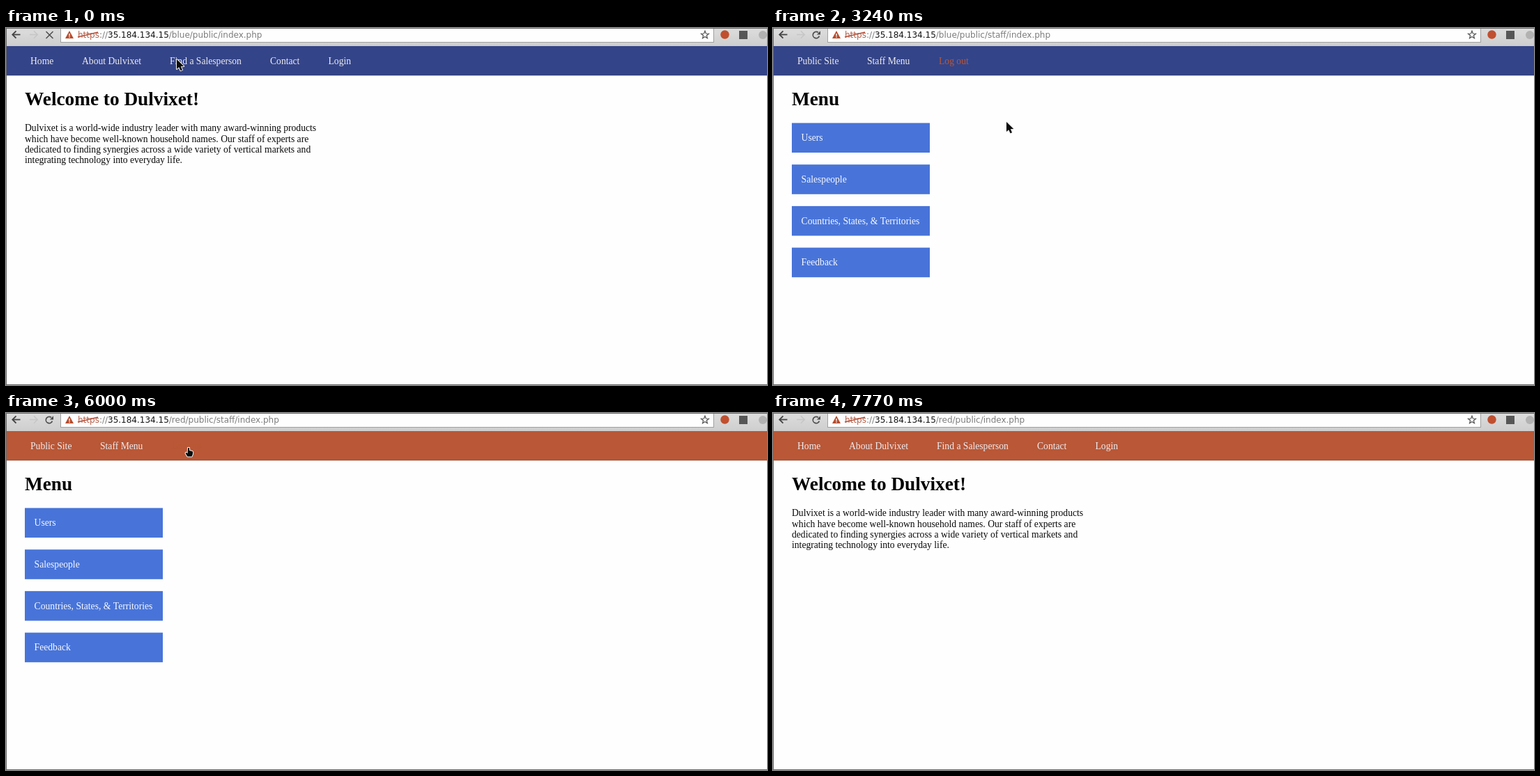
These frames come from a looping animation (1092x513 px, 8 s). An HTML page with a canvas:

```html
<!DOCTYPE html>
<html lang="en">
<head>
<meta charset="utf-8">
<title>Browser tour</title>
<style>
html, body { margin: 0; width: 100%; height: 100%; overflow: hidden; background: #fefefe; }
canvas { display: block; }
</style>
</head>
<body>
<canvas id="stage" width="1092" height="513"></canvas>
<script>
const ctx = document.getElementById('stage').getContext('2d');
const LOOP = 8000, ZOOM = 0.853, LINE = 18 * ZOOM, GAP = 16 * ZOOM, LEFT = 27;
const BLUE = '#344488', RED = '#b95736', INK = '#0a0a0a', LINK = '#0000e4';
const SERIF = '"Liberation Serif", "Times New Roman", serif';
const SANS = '"Liberation Sans", Arial, sans-serif';
const UI = '"DejaVu Sans", sans-serif';
const BODY = 16 * ZOOM + 'px ' + SERIF;

const PUBLIC = [[35, 'Home'], [109, 'About Dulvixet'], [235, 'Find a Salesperson'], [379, 'Contact'], [462.5, 'Login']];
const STAFF = [[35, 'Public Site'], [135, 'Staff Menu'], [238, 'Log out', RED]];

// Each entry changes only the listed parts of the view
const VIEWS = [
  [0, { page: home, nav: PUBLIC, site: 'blue', path: 'index.php', busy: true }],
  [150, { path: 'territories.php' }],
  [270, { page: people }],
  [390, { busy: false }],
  [1900, { path: 'staff/index.php', busy: true }],
  [2050, { page: menu, nav: STAFF, busy: false }],
  [5270, { tip: 'Staff Menu' }],
  [5420, { tip: '', site: 'red' }],
  [6400, { page: login, nav: STAFF.slice(0, 1), site: 'blue', path: 'staff/login.php' }],
  [7770, { page: home, nav: PUBLIC, site: 'red', path: 'index.php' }]
];

// time, x, y, shape; the pointer jumps from step to step
const POINTER = [
  [0, 245, 45, arrow], [1230, 266, 46, hand], [1370, 318, 47, hand], [1500, 378, 46, hand],
  [1630, 437, 44, arrow], [1760, 477, 43, hand], [1900, 477, 43, arrow],
  [2510, 432, 72, arrow], [2660, 340, 114, arrow], [2810, 288, 131, arrow],
  [3240, 335, 135, arrow], [3360, 370, 149, arrow], [3500, 380, 159, arrow], [3640, 374, 153, arrow],
  [3780, 356, 134, arrow], [3915, 334, 106, arrow], [4050, 313, 75, arrow], [4190, 301, 53, arrow],
  [4470, 298, 29, arrow], [4605, 293, 5, arrow], [4740, 0, 0, null],
  [5700, 279, 8, arrow], [5850, 269, 32, arrow], [6000, 262, 50, hand],
  [6400, 312, 212, arrow], [6950, 310, 185, arrow], [7110, 304, 118, arrow],
  [7270, 297, 48, arrow], [7440, 291, 6, arrow], [7600, 0, 0, null]
];

function text(str, x, y, font = BODY, color = INK) {
  ctx.font = font;
  ctx.fillStyle = color;
  ctx.fillText(str, x, y);
  return x + ctx.measureText(str).width;
}

function rect(x, y, w, h, color) {
  ctx.fillStyle = color;
  ctx.fillRect(x, y, w, h);
}

function trace(points, close) {
  ctx.beginPath();
  points.forEach(([x, y]) => ctx.lineTo(x, y));
  if (close) ctx.closePath();
}

function stroke(color, width) {
  ctx.strokeStyle = color;
  ctx.lineWidth = width;
  ctx.stroke();
}

function line(points, color, width) {
  trace(points);
  stroke(color, width);
}

function shape(points, color) {
  trace(points, true);
  ctx.fillStyle = color;
  ctx.fill();
}

function disc(x, y, r, color) {
  ctx.beginPath();
  ctx.arc(x, y, r, 0, Math.PI * 2);
  ctx.fillStyle = color;
  ctx.fill();
}

function title(str) {
  text(str, LEFT, 111, 'bold ' + 32 * ZOOM + 'px ' + SERIF, '#000');
}

function home() {
  title('Welcome to Dulvixet!');
  [
    'Dulvixet is a world-wide industry leader with many award-winning products',
    'which have become well-known household names. Our staff of experts are',
    'dedicated to finding synergies across a wide variety of vertical markets and',
    'integrating technology into everyday life.'
  ].forEach((str, i) => text(str, LEFT, 148.2 + i * LINE));
}

function people() {
  title('Find a Salesperson');
  let y = 148.2;
  const indent = LEFT + 40 * ZOOM;
  const next = () => y += LINE;
  const bullet = () => rect(48, Math.round(y - 5.6), 4, 4, INK);
  const link = name => {
    const end = text(name, indent, y, BODY, LINK);
    rect(indent, Math.round(y + 1), end - indent, 1, LINK);
  };
  text('Use the list below to find a salesperson nearby. We are ready to serve you!', LEFT, y);
  y += LINE + GAP;
  text('UNITED STATES', LEFT, y, 'bold ' + BODY);
  [
    ['Alabama (AL)', 'Nevan Dulse'],
    ['Alaska (AK)', 'Victor Membiles'],
    ['Arizona (AZ)', 'Celia Durnit'],
    ['Arkansas (AR)', 'Seraphina Ulvet'],
    ['California (CA)', ['Northern California', 'Victor Membiles'], ['Southern California', 'Bonnie Cestalo']],
    ['Colorado (CO)', 'Celia Durnit'],
    ['Connecticut (CT)']
  ].forEach(([state, ...items]) => {
    y += LINE + GAP;
    text(state, LEFT, y);
    items.forEach(item => {
      next();
      bullet();
      if (Array.isArray(item)) {
        text(item[0], indent, y);
        next();
        link(item[1]);
      } else link(item);
    });
  });
}

function menu() {
  title('Menu');
  ['Users', 'Salespeople', 'Countries, States, & Territories', 'Feedback'].forEach((str, i) => {
    const y = 136.5 + i * 59.7;
    rect(LEFT, y, 198, 42.6, '#4874d9');
    text(str, 40.6, y + 25.6, BODY, '#f6f8fe');
  });
}

function field(y) {
  rect(LEFT, y, 131, 18, '#a2a2a2');
  rect(LEFT + 1, y + 1, 129, 16, '#fff');
}

function login() {
  title('Log in');
  text('Username:', LEFT, 148.2);
  field(152);
  text('Password:', LEFT, 181.4);
  field(185);
  rect(27, 204, 48, 17, '#a6a6a6');
  const g = ctx.createLinearGradient(0, 205, 0, 220);
  g.addColorStop(0, '#f4f4f4');
  g.addColorStop(1, '#dddddd');
  rect(28, 205, 46, 15, g);
  text('Submit', 33.4, 216, 13.333 * ZOOM + 'px ' + SANS);
}

function arrow() {
  const points = [[0, 0], [0, 14], [3.2, 11.2], [5.6, 16.2], [8, 15.2], [5.8, 10.3], [10.2, 10]];
  trace(points, true);
  ctx.lineJoin = 'round';
  stroke('#f4f4f4', 2);
  shape(points, '#0b0b0b');
}

function hand() {
  const points = [[-1, 0], [1, 0], [1.2, 4], [5.4, 5], [6.2, 6], [6, 9], [4.6, 12.4], [-1.6, 12.4], [-4.4, 8], [-3.8, 6.8], [-1.4, 8]];
  trace(points, true);
  ctx.lineJoin = 'round';
  stroke('#f4f4f4', 2);
  shape(points, '#0b0b0b');
}

function reload() {
  ctx.beginPath();
  ctx.arc(62, 10, 4.7, 0.35, Math.PI * 1.72);
  stroke('#4c4c4c', 1.7);
  shape([[68, 4.2], [68, 9.4], [62.8, 9.4]], '#4c4c4c');
}

function star(cx, cy) {
  const points = Array.from({ length: 10 }, (_, i) => {
    const r = i % 2 ? 2.5 : 5.8, a = i * Math.PI / 5 - Math.PI / 2;
    return [cx + r * Math.cos(a), cy + r * Math.sin(a)];
  });
  trace(points, true);
  stroke('#505050', 1.2);
}

function toolbar(view) {
  const g = ctx.createLinearGradient(0, 0, 0, 26);
  g.addColorStop(0, '#dddddd');
  g.addColorStop(1, '#cecece');
  rect(0, 0, 1092, 26, g);
  rect(78, 0, 938, 21, '#a0a0a0');
  rect(79, 0, 936, 20, '#fefefe');

  line([[20.5, 9.5], [9.5, 9.5]], '#444', 1.8);
  line([[14.5, 4.3], [9.3, 9.5], [14.5, 14.7]], '#444', 1.8);
  line([[34, 9.5], [45, 9.5]], '#c6c6c6', 1.6);
  line([[40, 4.3], [45.2, 9.5], [40, 14.7]], '#c6c6c6', 1.6);
  if (view.busy) {
    line([[57.5, 5], [67.5, 15]], '#4c4c4c', 1.5);
    line([[67.5, 5], [57.5, 15]], '#4c4c4c', 1.5);
  } else reload();

  shape([[91, 4], [97, 15], [85, 15]], '#b84c2c');
  rect(90.3, 8, 1.4, 3.6, '#fff');
  rect(90.3, 12.4, 1.4, 1.4, '#fff');

  const font = '12px ' + UI, grey = '#7c7c7c';
  let x = text('https', 103, 14, font, '#b5604a');
  line([[103, 13], [132, 6]], '#b5503a', 1.4);
  x = text('://', x, 14, font, grey);
  x = text('35.184.134.15', x, 14, font, '#151515');
  text(`/${view.site}/public/${view.path}`, x, 14, font, grey);

  star(1003, 10);
  disc(1031.5, 9.5, 6.2, '#c04f2f');
  rect(1052, 4, 12, 12, '#565656');
  disc(1086, 10, 6, '#b2b2b2');
}

function viewAt(t) {
  return Object.assign({}, ...VIEWS.filter(v => v[0] <= t).map(v => v[1]));
}

function draw(t) {
  const view = viewAt(t);
  rect(0, 0, 1092, 513, '#fefefe');
  toolbar(view);
  const red = view.site === 'red';
  rect(0, 26, 1092, 42, red ? RED : BLUE);
  rect(0, 67.5, 1092, 0.8, red ? '#8f452d' : '#2a376e');
  view.nav.forEach(([x, str, color]) => text(str, x, 52, BODY, color || '#ececf2'));
  view.page();

  if (view.tip) {
    rect(303, 0, 64, 7, '#2e2e2e');
    text(view.tip, 306, 3.6, '11px ' + UI, '#e8e8e8');
  }

  rect(0, 0, 1092, 1, '#6a6a6a');
  rect(0, 0, 1, 513, '#6a6a6a');
  rect(0, 512, 1092, 1, '#6a6a6a');

  const [, x, y, kind] = POINTER.filter(p => p[0] <= t).pop();
  if (kind) {
    ctx.save();
    ctx.translate(x, y);
    kind();
    ctx.restore();
  }
}

const start = performance.now();
function tick() {
  draw((performance.now() - start) % LOOP);
  requestAnimationFrame(tick);
}
tick();
</script>
</body>
</html>
```
